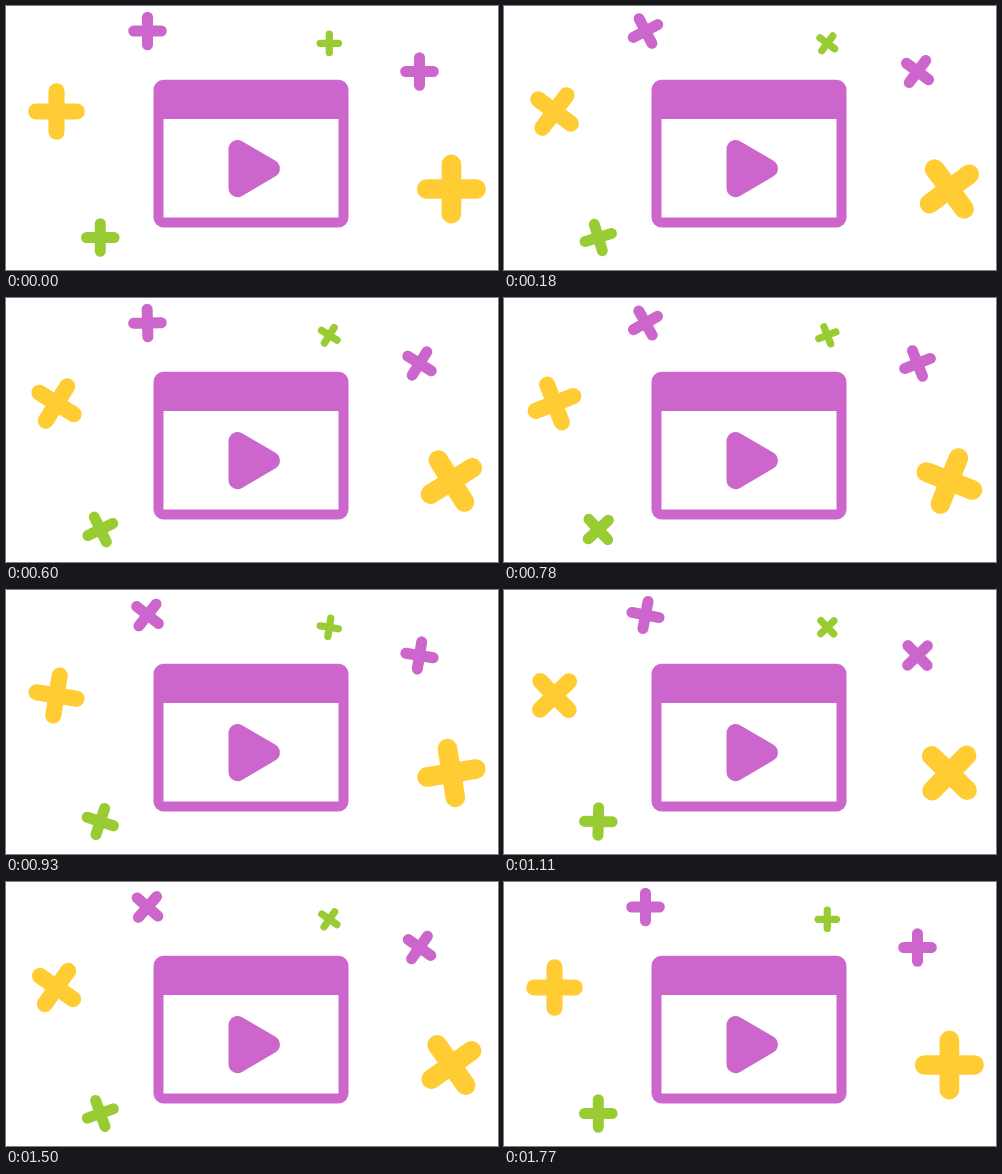
An HTML page that plays this animation: 492 by 264 pixels, repeating every 1.8 s.

```html
<!DOCTYPE html>
<html lang="en">
<head>
<meta charset="utf-8">
<title>Video window with spinning pluses</title>
<style>
  html, body { margin: 0; width: 100%; height: 100%; overflow: hidden; background: #fff; }
  svg { display: block; }
</style>
</head>
<body>
<svg id="stage" width="492" height="264" viewBox="0 0 492 264">
  <g fill="#cc66cc">
    <rect x="147.5" y="73.8" width="195" height="147.7" rx="10"/>
    <rect x="157.5" y="113" width="175" height="98.5" fill="#fff"/>
    <path d="M231.5 143V182.2L265 162.6Z" stroke="#cc66cc" stroke-width="18" stroke-linejoin="round"/>
  </g>
</svg>
<script>
const STEP = 30, STEPS = 60;
const PURPLE = '#cc66cc', YELLOW = '#ffcc33', GREEN = '#99cc33';

// x, y, half size, colour, degrees turned per loop
const pluses = [
  [141.5, 25, 19.3, PURPLE, -270],
  [413.5, 65.5, 19.3, PURPLE, 360],
  [50.5, 105.5, 28.3, YELLOW, 360],
  [445.4, 183, 34.5, YELLOW, -360],
  [94.3, 231.5, 19.3, GREEN, 720],
  [323.3, 37.3, 12.8, GREEN, 360]
].map(([x, y, half, color, turn]) => {
  const el = document.createElementNS('http://www.w3.org/2000/svg', 'path');
  const width = half * 0.57, arm = half - width / 2;
  el.setAttribute('d', `M${-arm} 0H${arm}M0 ${-arm}V${arm}`);
  el.setAttribute('stroke', color);
  el.setAttribute('stroke-width', width);
  el.setAttribute('stroke-linecap', 'round');
  document.getElementById('stage').append(el);
  return { el, x, y, turn };
});

function draw(now) {
  // The last step completes the turn, so the rest pose shows twice per loop.
  const progress = Math.floor(now / STEP) % STEPS / (STEPS - 1);
  for (const { el, x, y, turn } of pluses) {
    el.setAttribute('transform', `translate(${x} ${y}) rotate(${turn * progress})`);
  }
}

let start;
function tick(now) {
  start ??= now;
  draw(now - start);
  requestAnimationFrame(tick);
}
draw(0);
requestAnimationFrame(tick);
</script>
</body>
</html>
```
